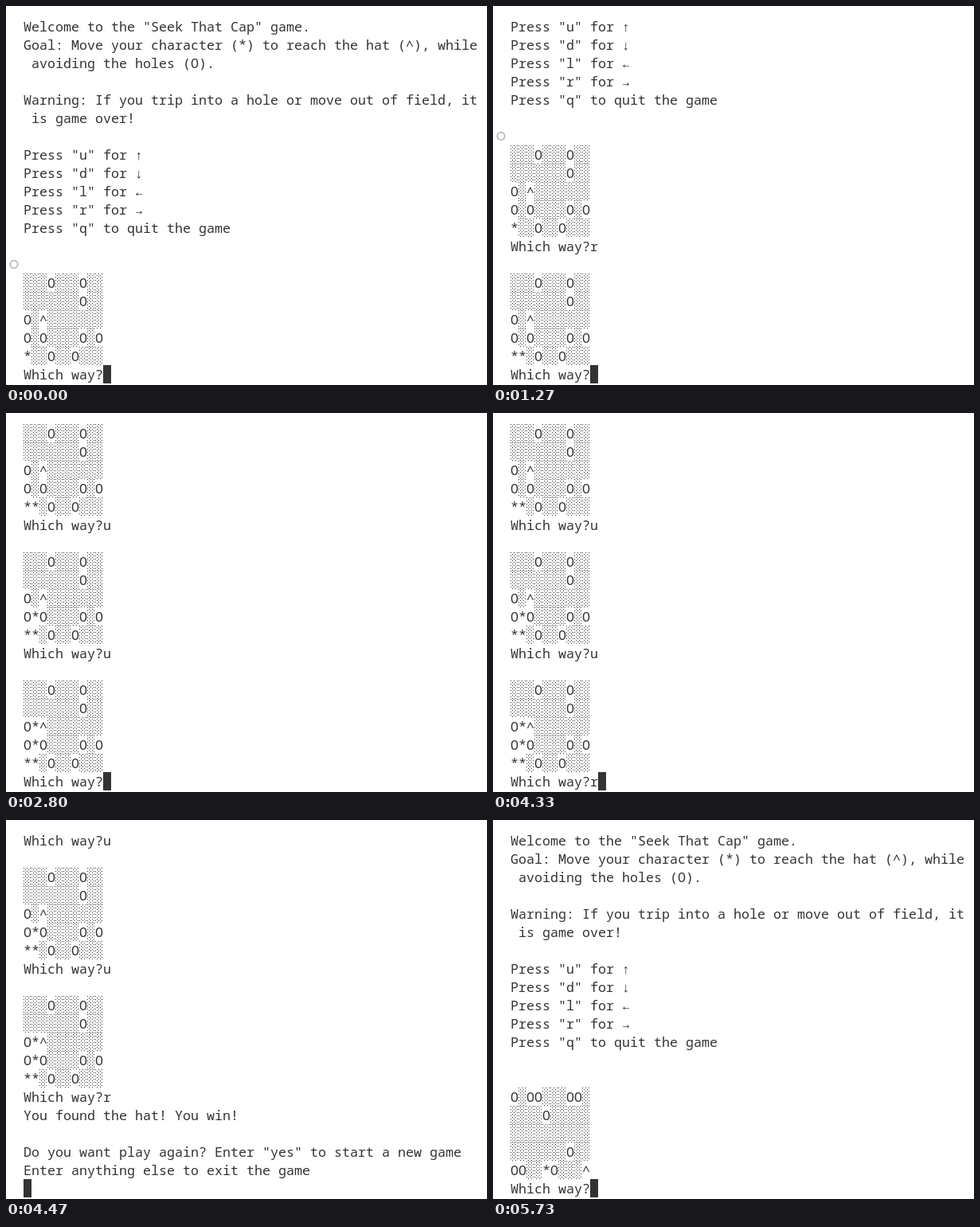
Animation of 604x476 px, one loop 8 s. Source, as an HTML page with a canvas:

```html
<!DOCTYPE html>
<html lang="en">
<head>
<meta charset="utf-8">
<title>Terminal game</title>
<style>
  html, body { margin: 0; width: 100%; height: 100%; overflow: hidden; background: #fff; }
  canvas { display: block; }
</style>
</head>
<body>
<canvas id="screen" width="604" height="476"></canvas>
<script>
const ctx = document.getElementById('screen').getContext('2d');
const LOOP = 8000, ROWS = 20;
const CW = 10, CH = 23, LEFT = 22, TOP = 14, BASE = 18;
const INK = '#333333';
const FONT = '16.667px "Noto Sans Mono", "DejaVu Sans Mono", monospace';
const ASK = 'Which way?';

const intro = [
  'Welcome to the "Seek That Cap" game.',
  'Goal: Move your character (*) to reach the hat (^), while',
  ' avoiding the holes (O).',
  '',
  'Warning: If you trip into a hole or move out of field, it',
  ' is game over!',
  '',
  'Press "u" for ↑',
  'Press "d" for ↓',
  'Press "l" for ←',
  'Press "r" for →',
  'Press "q" to quit the game',
  '',
  ''
];
const MARK_LINE = intro.length - 1;

const field = [
  '░░░O░░░O░░',
  '░░░░░░░O░░',
  'O░^░░░░░░░',
  'O░O░░░░O░O',
  '*░░O░░O░░░'
];
const nextField = [
  'O░OO░░░OO░',
  '░░░░O░░░░░',
  '░░░░░░░░░░',
  '░░░░░░░O░░',
  'OO░░*O░░░^'
];

// Leave a star on column 1 of the given row.
function step(rows, y) {
  return rows.map((r, i) => i === y ? r[0] + '*' + r.slice(2) : r);
}
const right = step(field, 4);
const up = step(right, 3);
const upAgain = step(up, 2);

// Each event appends text to the terminal; reset clears it first.
const events = [
  { at: 0, text: [...intro, ...field, ASK], reset: true, mark: true },
  { at: 1130, text: ['r'] },
  { at: 1270, text: ['', '', ...right, ASK] },
  { at: 2400, text: ['u'] },
  { at: 2530, text: ['', '', ...up, ASK] },
  { at: 2730, text: ['u'] },
  { at: 2800, text: ['', '', ...upAgain, ASK] },
  { at: 4330, text: ['r'] },
  { at: 4400, text: ['', 'You found the hat! You win!', ''] },
  { at: 4470, text: ['', 'Do you want play again? Enter "yes" to start a new game',
                     'Enter anything else to exit the game', ''] },
  { at: 5270, text: ['y'] },
  { at: 5400, text: ['e'] },
  { at: 5530, text: ['s'] },
  { at: 5730, text: [...intro, ...nextField, ASK], reset: true }
];

function terminalAt(t) {
  let lines = [''], mark = false;
  for (const e of events) {
    if (e.at > t) break;
    if (e.reset) {
      lines = [''];
      mark = !!e.mark;
    }
    lines[lines.length - 1] += e.text[0];
    lines.push(...e.text.slice(1));
  }
  return { lines, mark };
}

// Light shade block: two dots per 4 by 4 tile, restarted in each cell.
function shade(x, y) {
  for (let j = 0; j < CH; j += 2)
    for (let i = j % 4; i < CW; i += 4) ctx.fillRect(x + i, y + j, 1, 1);
}

function drawLine(line, y) {
  [...line].forEach((c, i) => {
    const x = LEFT + i * CW;
    if (c === '░') shade(x, y);
    else if (c !== ' ') ctx.fillText(c, x, y + BASE);
  });
}

function drawMark(y) {
  ctx.strokeStyle = '#bfbfbf';
  ctx.lineWidth = 2;
  ctx.beginPath();
  ctx.arc(10, y + 11.5, 4.7, 0, Math.PI * 2);
  ctx.stroke();
}

function draw(t) {
  const { lines, mark } = terminalAt(t);
  const first = Math.max(0, lines.length - ROWS);
  const rowY = n => TOP + (n - first) * CH;
  const last = lines.length - 1;

  ctx.fillStyle = '#fff';
  ctx.fillRect(0, 0, 604, 476);
  ctx.fillStyle = INK;
  ctx.font = FONT;
  for (let n = first; n <= last; n++) drawLine(lines[n], rowY(n));
  ctx.fillRect(LEFT + lines[last].length * CW, rowY(last), CW, CH);
  if (mark && first <= MARK_LINE) drawMark(rowY(MARK_LINE));
}

const start = performance.now();
function tick() {
  draw((performance.now() - start) % LOOP);
  requestAnimationFrame(tick);
}
tick();
</script>
</body>
</html>
```
